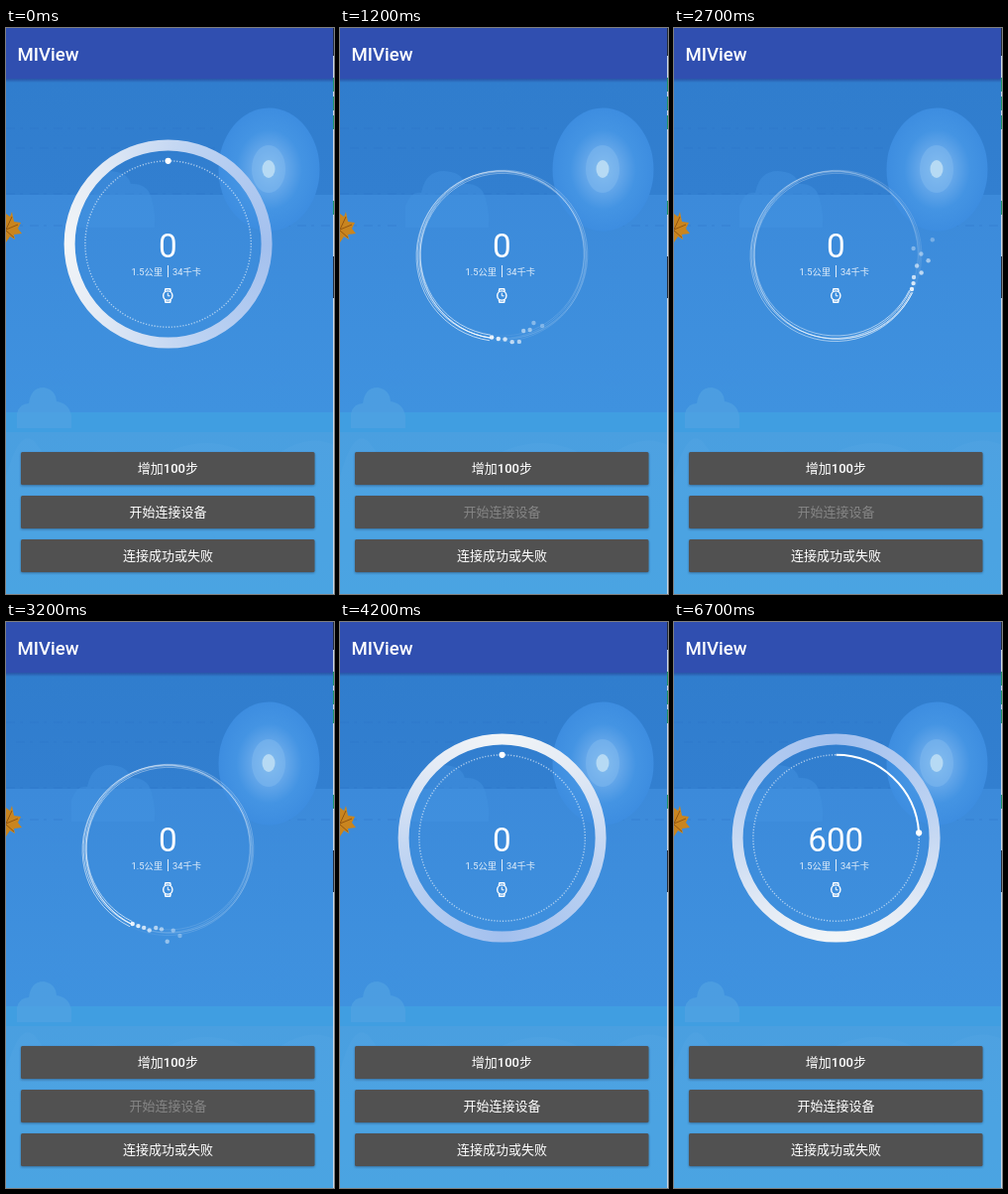
Animation, 331 px wide and 570 px high, one loop 6800 ms. Source, as an HTML page with a canvas:

```html
<!DOCTYPE html>
<html lang="zh">
<head>
<meta charset="utf-8">
<title>MIView</title>
<style>
html, body { margin: 0; width: 100%; height: 100%; overflow: hidden; background: #3d90dd; }
svg, canvas { position: absolute; left: 0; top: 0; width: 331px; height: 570px; }
text { font-family: Roboto, 'Noto Sans CJK SC', 'Noto Sans CJK', sans-serif; fill: #fff; }
.mid { text-anchor: middle; }
</style>
</head>
<body>
<svg viewBox="0 0 331 570">
  <defs>
    <linearGradient id="sky" x2="0" y2="1">
      <stop offset="0" stop-color="#2f7ccc"/>
      <stop offset=".295" stop-color="#327fd0"/>
      <stop offset=".295" stop-color="#3c8ada"/>
      <stop offset=".679" stop-color="#3f92df"/>
      <stop offset=".679" stop-color="#409ee1"/>
      <stop offset=".714" stop-color="#409ee1"/>
      <stop offset=".714" stop-color="#4a9fe0"/>
      <stop offset="1" stop-color="#45a3e2"/>
    </linearGradient>
    <linearGradient id="shade" x2="0" y2="1">
      <stop offset="0" stop-color="#233a8c" stop-opacity=".6"/>
      <stop offset="1" stop-color="#233a8c" stop-opacity="0"/>
    </linearGradient>
    <radialGradient id="sun">
      <stop offset="0" stop-color="#8cc3f0"/>
      <stop offset=".3" stop-color="#68a9ea"/>
      <stop offset=".65" stop-color="#4494e3"/>
      <stop offset="1" stop-color="#3d8de0"/>
    </radialGradient>
    <filter id="lift" x="-5%" y="-20%" width="110%" height="150%">
      <feDropShadow dx="0" dy="1" stdDeviation="1" flood-color="#1c3654" flood-opacity=".5"/>
    </filter>
  </defs>
  <rect width="331" height="570" fill="url(#sky)"/>
  <g fill="none" stroke="#2b70c4" stroke-opacity=".4" stroke-dasharray="9 5 3 7">
    <path d="M0 101H210M10 121H215M0 167H218M0 199H60M270 199H331"/>
  </g>
  <ellipse cx="265.5" cy="142.5" rx="51" ry="62" fill="url(#sun)"/>
  <ellipse cx="265" cy="142" rx="17" ry="24" fill="#7db8ee" opacity=".6"/>
  <ellipse cx="265" cy="142" rx="6.5" ry="9" fill="#b6daf4"/>
  <path d="M66 201V179Q71 164 82 166Q86 144 105 144Q123 145 126 157Q145 156 148 176Q151 185 150 201Z" fill="#4493df" opacity=".45"/>
  <path d="M11 403V388Q14 378 23 378Q25 362 38 362Q50 364 51 376Q64 378 66 391V403Z" fill="#52a3e3" opacity=".7"/>
  <g fill="#5aa9e5" opacity=".25">
    <path d="M0 452Q14 400 30 418Q40 430 48 452Q92 405 140 440Q205 396 260 440Q300 405 331 420V570H0Z"/>
    <circle cx="122" cy="490" r="34"/><circle cx="235" cy="500" r="28"/>
    <path d="M0 548Q80 530 160 552T331 545V570H0Z"/>
  </g>
  <path d="M0 187L4 190L6 185L8 195L15 196L12 202L16 207L8 208L9 213L4 210L0 216Z" fill="#c9851f"/>
  <path d="M0 203L12 198M0 203L6 190M0 204L8 211" stroke="#94560f" fill="none"/>
  <rect y="51" width="331" height="4" fill="url(#shade)"/>
  <rect width="331" height="51" fill="#304fb0"/>
  <g>
    <rect x="330" width="1" height="570" fill="#c8d6e6"/>
    <path d="M330.5 0V28M330.5 230V272" stroke="#222c3c"/>
    <path d="M330.5 50V102M330.5 174V191" stroke="#1f9268" stroke-dasharray="14 5"/>
  </g>
  <text x="11.5" y="33" font-size="18.6" font-weight="500">MIView</text>
  <text id="steps" class="mid" x="163.3" y="230.7" font-size="33.2">0</text>
  <g font-size="9.3" opacity=".85">
    <text x="126.5" y="249.3">1.5公里</text>
    <text x="168" y="249.3">34千卡</text>
    <path d="M163.5 239V251" stroke="#fff"/>
  </g>
  <g fill="none" stroke="#fff" stroke-width="1.4">
    <circle cx="163.3" cy="269.5" r="4.6"/>
    <path d="M160.3 265.5L161 262.8H165.6L166.3 265.5M160.3 273.5L161 276.2H165.6L166.3 273.5"/>
    <path d="M163.3 266.8V269.8H165.6" stroke-width="1"/>
  </g>
  <g id="buttons"></g>
</svg>
<canvas id="view"></canvas>
<script>
const W = 331, H = 570, LOOP = 6800, TICK = 100;
const CX = 163.6, REST_Y = 217.5, LINK_Y = 228.7, DIAL_R = 83.7;
const GOAL = 2500;
const CLICKS = [4700, 4900, 5100, 5300, 5500, 5700];
const START = 400, DONE = 3500;

// Keyframes as [time, value] pairs
const SPIN = [[0, 270], [700, 285], [3500, -60], [4200, 0], [5200, 95], [5900, 152], [6300, 163], [6700, 180]];
const HEAD = [[400, 28], [1200, 188], [2100, 367.5], [3200, 566], [3900, 692]];
const RING_ALPHA = [[400, 1], [750, 0], [3400, 0], [3700, 1]];
const RING_R = [[400, 99.5], [750, 86], [3400, 86], [3800, 107], [4150, 99.5]];
const RING_Y = [[400, REST_Y], [750, LINK_Y], [3800, LINK_Y], [4150, REST_Y]];
const DIAL_ALPHA = [[400, 1], [600, 0], [3800, 0], [4100, 1]];
const LINK_ALPHA = [[500, 0], [900, 1], [3300, 1], [3600, 0]];

const $ = id => document.getElementById(id);
const rad = deg => (deg - 90) * Math.PI / 180;
const rand = n => { const s = Math.sin(n * 127.1 + 11.7) * 43758.5453; return s - Math.floor(s); };

function at(keys, t) {
  if (t <= keys[0][0]) return keys[0][1];
  for (let i = 1; i < keys.length; i++) {
    const [t0, v0] = keys[i - 1], [t1, v1] = keys[i];
    if (t <= t1) return v0 + (v1 - v0) * (t - t0) / (t1 - t0);
  }
  return keys[keys.length - 1][1];
}

const buttons = [['增加100步', 427], ['开始连接设备', 471], ['连接成功或失败', 515]];
$('buttons').innerHTML = buttons.map(([label, y], i) => `
  <rect x="15" y="${y}" width="296.5" height="33" rx="1.5" fill="#515151" filter="url(#lift)"/>
  <clipPath id="clip${i}"><rect x="15" y="${y}" width="296.5" height="33" rx="1.5"/></clipPath>
  <circle id="ripple${i}" cx="95" cy="${y + 16}" fill="#fff" opacity="0" clip-path="url(#clip${i})"/>
  <text id="label${i}" class="mid" x="163.4" y="${y + 21.3}" font-size="13" font-weight="500">${label}</text>`).join('');

const view = $('view'), dpr = window.devicePixelRatio || 1;
view.width = W * dpr;
view.height = H * dpr;
const g = view.getContext('2d');
g.scale(dpr, dpr);

function circle(x, y, r, from = 0, to = 360) {
  g.beginPath();
  g.arc(x, y, r, rad(from), rad(to));
}

function dot(x, y, r, alpha) {
  g.globalAlpha = alpha;
  g.fillStyle = '#fff';
  circle(x, y, r);
  g.fill();
}

function drawRing(t) {
  const alpha = at(RING_ALPHA, t);
  if (!alpha) return;
  const y = at(RING_Y, t);
  const paint = g.createConicGradient(rad(at(SPIN, t)), CX, y);
  [[0, '#f2f5f7'], [.12, '#e4ebf5'], [.3, '#bcd2f2'], [.5, '#a3c0ee'], [.7, '#bcd2f2'], [.88, '#e4ebf5'], [1, '#f2f5f7']]
    .forEach(([p, c]) => paint.addColorStop(p, c));
  g.globalAlpha = alpha;
  g.strokeStyle = paint;
  g.lineWidth = 11;
  circle(CX, y, at(RING_R, t));
  g.stroke();
}

function drawDial(t, steps) {
  const alpha = at(DIAL_ALPHA, t);
  if (!alpha) return;
  const y = at(RING_Y, t), end = steps / GOAL * 360;
  g.strokeStyle = '#fff';
  g.globalAlpha = alpha * .6;
  g.lineWidth = 1.4;
  g.setLineDash([1.2, 1.7]);
  circle(CX, y, DIAL_R, end, 360);
  g.stroke();
  g.setLineDash([]);
  if (end) {
    g.globalAlpha = alpha;
    g.lineWidth = 2;
    circle(CX, y, DIAL_R, 0, end);
    g.stroke();
  }
  dot(CX + DIAL_R * Math.cos(rad(end)), y + DIAL_R * Math.sin(rad(end)), 3.1, alpha);
}

function drawLink(t) {
  const alpha = at(LINK_ALPHA, t);
  if (!alpha) return;
  const head = at(HEAD, t);
  const paint = g.createConicGradient(rad(head), CX, LINK_Y);
  [[0, .95], [.15, .75], [.4, .5], [.7, .3], [.92, .16], [1, .04]]
    .forEach(([p, a]) => paint.addColorStop(p, `rgba(255,255,255,${a})`));
  g.strokeStyle = paint;
  g.globalAlpha = alpha * .8;
  g.lineWidth = .9;
  // Loosely stacked strands, each slightly off centre
  for (let i = 0; i < 5; i++) {
    const turn = rad(i * 144);
    circle(CX + 1.3 * Math.cos(turn), LINK_Y + 1.3 * Math.sin(turn), 82.6 + i * .8, head, head + 358);
    g.stroke();
  }

  // Sparks stay where they were shed and drift off the circle
  const gap = 23, last = Math.floor(t / gap);
  for (let k = last; k > last - 9; k--) {
    const born = k * gap, age = (t - born) / (9 * gap);
    if (born < START) break;
    const a = rad(at(HEAD, born)), r = 83.5 + (rand(k) * 34 - 14) * age ** 1.4;
    dot(CX + r * Math.cos(a), LINK_Y + r * Math.sin(a), 2.2, alpha * (.9 - .65 * age));
  }
}

function ripple(i, age) {
  const on = age >= 0 && age < 300, el = $('ripple' + i);
  el.setAttribute('r', on ? 20 + age * .35 : 0);
  el.setAttribute('opacity', on ? .11 * (1 - age / 400) : 0);
}

function draw(t) {
  const done = CLICKS.filter(c => c <= t), steps = done.length * 100;
  $('steps').textContent = steps;
  ripple(0, done.length ? t - done[done.length - 1] : -1);
  ripple(1, t - START);
  $('label1').setAttribute('fill-opacity', t > START && t < DONE ? .3 : 1);
  g.clearRect(0, 0, W, H);
  drawRing(t);
  drawDial(t, steps);
  drawLink(t);
  g.globalAlpha = 1;
}

const begin = performance.now();
function loop(now) {
  const t = Math.max(0, now - begin) % LOOP;
  draw(Math.floor(t / TICK) * TICK);
  requestAnimationFrame(loop);
}
draw(0);
requestAnimationFrame(loop);
</script>
</body>
</html>
```
